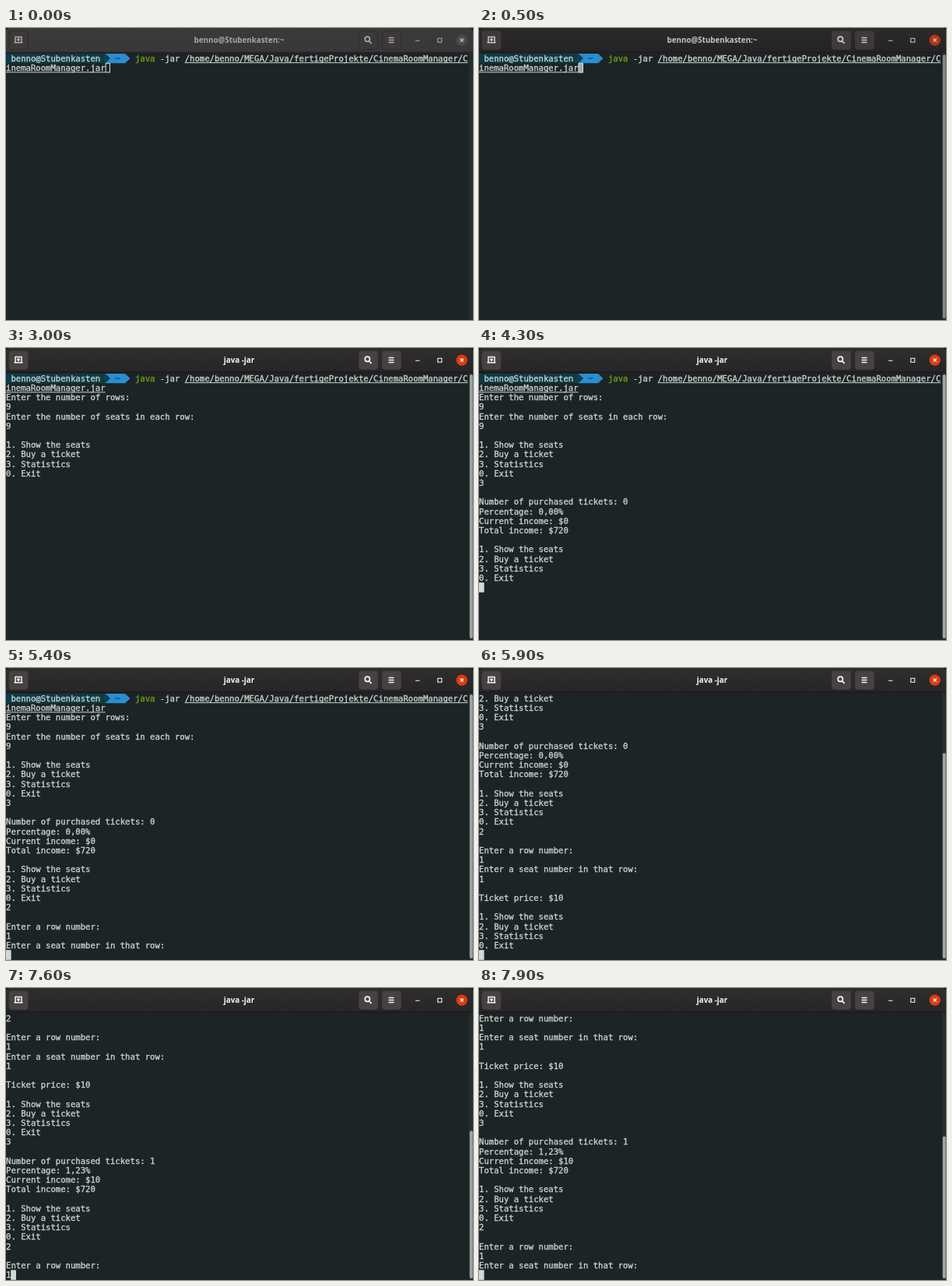
Animation of 600x375 px, one loop 8 s. Source, as an HTML page with a canvas:

```html
<!DOCTYPE html>
<html lang="en">
<head>
<meta charset="utf-8">
<title>Terminal session</title>
<style>
html, body { margin: 0; width: 100%; height: 100%; overflow: hidden; background: #1c2425; }
canvas { display: block; }
</style>
</head>
<body>
<canvas id="stage" width="600" height="375"></canvas>
<script>
const ctx = document.getElementById('stage').getContext('2d');
const LOOP = 8000, ROWS = 28, CELL_W = 6.38, CELL_H = 12.2, TOP = 33;
const BG = '#1c2425', FG = '#cbd0cf', BLUE = '#2b8dd2', TEAL = '#0d3c46';
const USER = 'benno', HOST = 'Stubenkasten';

const command = [
  ` ${USER}@${HOST}   ~   java -jar /home/${USER}/MEGA/Java/fertigeProjekte/CinemaRoomManager/C`,
  'inemaRoomManager.jar'
].join('\n');
const menu = '\n1. Show the seats\n2. Buy a ticket\n3. Statistics\n0. Exit\n';
const askRow = '\n\nEnter a row number:\n';
const askSeat = '\nEnter a seat number in that row:\n';
const stats = (sold, percent, income) =>
  `\n\nNumber of purchased tickets: ${sold}\nPercentage: ${percent}%\n` +
  `Current income: $${income}\nTotal income: $720\n${menu}`;

// What is typed or printed, and when (ms)
const log = [
  [0, command],
  [900, '\n'],
  [1100, 'Enter the number of rows:\n'],
  [1300, '9'],
  [1700, '\nEnter the number of seats in each row:\n'],
  [2100, '9'],
  [2400, '\n' + menu],
  [4000, '3'],
  [4200, stats(0, '0,00', 0)],
  [4600, '2'],
  [4700, askRow],
  [5200, '1'],
  [5400, askSeat],
  [5800, '1'],
  [5900, '\n\nTicket price: $10\n' + menu],
  [6400, '3'],
  [6600, stats(1, '1,23', 10)],
  [7000, '2'],
  [7200, askRow],
  [7600, '1'],
  [7800, askSeat]
];

const linesAt = t => log.filter(e => e[0] <= t).map(e => e[1]).join('').split('\n');

function rect(x, y, w, h, color) {
  ctx.fillStyle = color;
  ctx.fillRect(x, y, w, h);
}

function poly(color, ...points) {
  ctx.fillStyle = color;
  ctx.beginPath();
  points.forEach(p => ctx.lineTo(...p));
  ctx.fill();
}

function roundBox(x, y, w, h, r, fill, stroke) {
  ctx.beginPath();
  ctx.roundRect(x, y, w, h, r);
  ctx.fillStyle = fill;
  ctx.fill();
  if (!stroke) return;
  ctx.strokeStyle = stroke;
  ctx.lineWidth = 1;
  ctx.stroke();
}

function strokePath(d, color, width) {
  ctx.strokeStyle = color;
  ctx.lineWidth = width;
  ctx.stroke(new Path2D(d));
}

function drawHeader(title, focused) {
  const ink = focused ? '#f7f6f5' : '#aaa8a6';
  const fill = ctx.createLinearGradient(0, 0, 0, 31);
  fill.addColorStop(0, focused ? '#302d2d' : '#3b3939');
  fill.addColorStop(1, focused ? '#272525' : '#393737');
  rect(0, 0, 600, 31, '#161616');
  roundBox(0, 0, 600, 31, [5, 5, 0, 0], fill);
  rect(0, 30.5, 600, 1, focused ? '#171616' : '#2a2929');

  for (const x of [4, 453.5, 483.5])
    roundBox(x, 4, 24, 23.5, 3, focused ? '#454241' : '#3c3a39', focused ? '#403d3c' : '#2d2b2b');

  strokePath('M12 18V11.5h8V18M10.5 18.7h11M16 12.8v4.4M13.8 15h4.4', ink, 1.5);
  strokePath('M467.4 14.3a3.1 3.1 0 1 0-6.2 0a3.1 3.1 0 1 0 6.2 0M466.5 16.7L469.6 19.8', ink, 1.7);
  strokePath('M491.5 12.5h7M491.5 15.5h7M491.5 18.5h7', ink, 1.5);
  strokePath('M526 16.3h5.5M554.8 13.3h5v5h-5z', ink, 1.1);

  ctx.beginPath();
  ctx.arc(585.7, 15.6, 7.2, 0, 7);
  ctx.fillStyle = focused ? '#dc3c16' : '#4d4b4a';
  ctx.fill();
  strokePath('M583.6 13.5l4.2 4.2M587.8 13.5l-4.2 4.2', focused ? ink : '#d0cecc', 1.2);

  ctx.font = 'bold 9.8px "Open Sans", "Noto Sans", sans-serif';
  ctx.textAlign = 'center';
  ctx.fillStyle = ink;
  ctx.fillText(title, 299.5, 19);
}

function drawPrompt(y) {
  const x = col => col * CELL_W, mid = y + CELL_H / 2, end = y + CELL_H;
  rect(0, y, x(20), CELL_H, TEAL);
  rect(x(20), y, x(4), CELL_H, BLUE);
  poly(TEAL, [x(20), y], [x(21), mid], [x(20), end]);
  poly(BLUE, [x(24), y], [x(25), mid], [x(24), end]);
}

function promptColor(col) {
  if (col === 22) return '#0f4864';
  return col >= 26 && col < 30 ? '#769c16' : FG;
}

function drawLine(text, row, y) {
  if (row === 0) drawPrompt(y);
  // A hairline outline gives the glyphs a medium weight
  ctx.lineWidth = 0.35;
  [...text].forEach((ch, col) => {
    ctx.fillStyle = ctx.strokeStyle = row === 0 ? promptColor(col) : FG;
    ctx.fillText(ch, col * CELL_W, y + 9.8);
    ctx.strokeText(ch, col * CELL_W, y + 9.8);
  });
  if (row > 1) return;
  const from = row === 0 ? 36 : 0;
  rect(from * CELL_W, y + 11.1, (text.length - from) * CELL_W, 1, FG);
}

function drawCursor(x, y, t, focus) {
  if (t >= 3000 && t < 3600) return;
  ctx.strokeStyle = '#dde1e0';
  ctx.lineWidth = 1;
  ctx.strokeRect(x + 0.5, y + 0.5, CELL_W - 1, CELL_H - 1);
  ctx.globalAlpha = focus;
  rect(x, y, CELL_W, CELL_H, '#d3d7d6');
  ctx.globalAlpha = 1;
}

function drawScrollbar(t, focus) {
  // The bar reacts slightly before the text is repainted
  const total = Math.max(ROWS, linesAt(Math.min(t + 100, LOOP - 1)).length);
  const y = 34 + 339 * (1 - ROWS / total);
  rect(595, 31, 5, 344, '#262d2e');
  ctx.globalAlpha = focus;
  roundBox(595.7, y, 4, 373 - y, 2, '#a3a5a3');
  ctx.globalAlpha = 1;
}

function draw(t) {
  const focus = Math.min(1, Math.max(0, Math.floor((t - 200) / 100) / 4));
  const lines = linesAt(t);
  const first = Math.max(0, lines.length - ROWS);
  const rowY = row => TOP + (row - first) * CELL_H;

  rect(0, 0, 600, 375, BG);
  ctx.font = '10.6px "DejaVu Sans Mono", monospace';
  ctx.textAlign = 'left';
  lines.forEach((text, row) => { if (row >= first) drawLine(text, row, rowY(row)); });
  const last = lines.length - 1;
  drawCursor(lines[last].length * CELL_W, rowY(last), t, focus);
  drawScrollbar(t, focus);

  const title = t < 900 ? `${USER}@${HOST}:~` : 'java -jar';
  if (focus < 1) drawHeader(title, false);
  ctx.globalAlpha = focus;
  drawHeader(title, true);
  ctx.globalAlpha = 1;
}

const start = performance.now();
function tick() {
  draw((performance.now() - start) % LOOP);
  requestAnimationFrame(tick);
}
tick();
</script>
</body>
</html>
```
